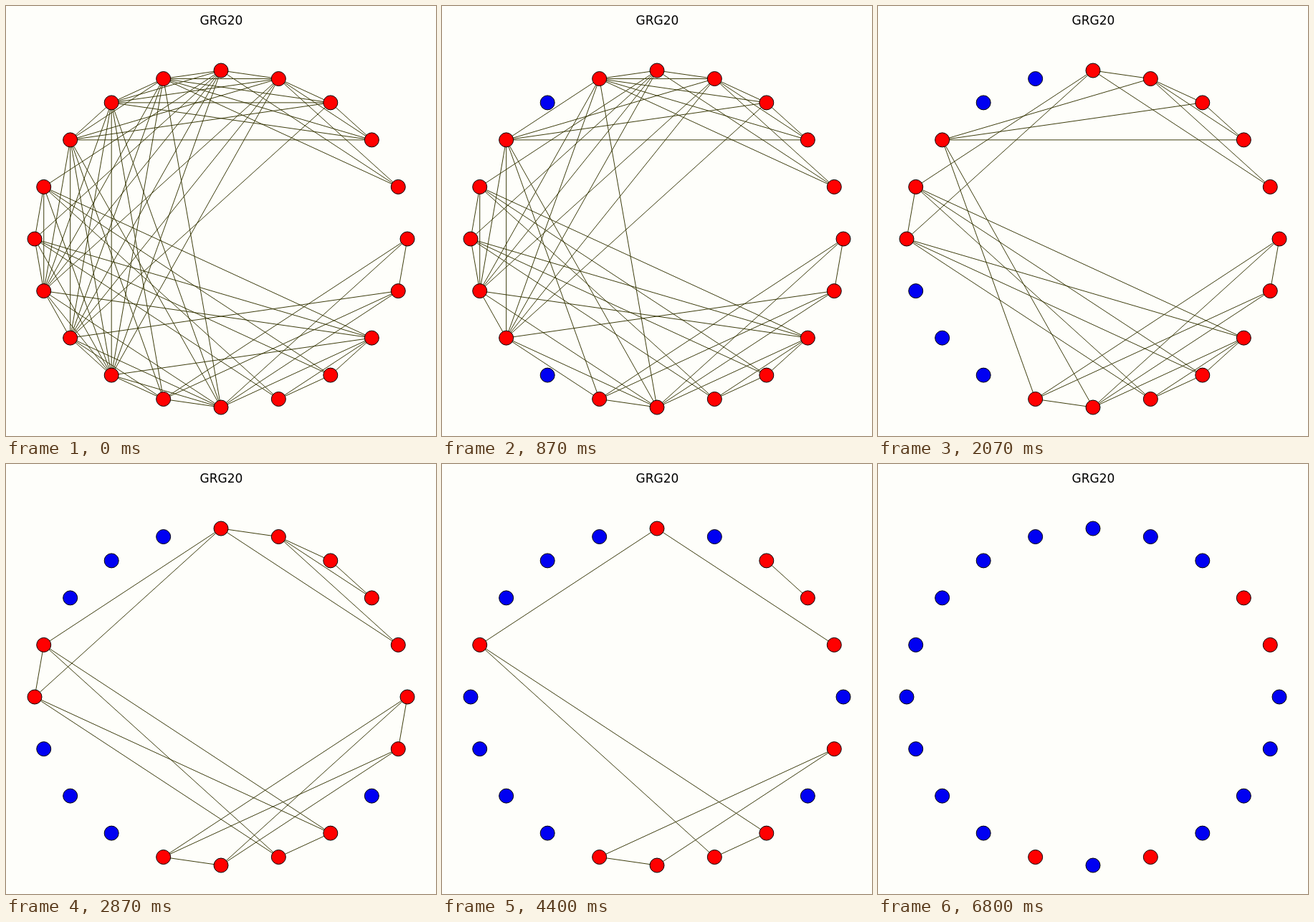
An HTML page for the animation above (6870 ms loop, 600 by 600 pixels).

```html
<!DOCTYPE html>
<html lang="en">
<head>
<meta charset="utf-8">
<title>Graph node removal</title>
<style>
  html, body { margin: 0; width: 100%; height: 100%; overflow: hidden; background: #fefefa; }
  svg { display: block; width: 100vw; height: 100vh; }
  line { stroke: #330; stroke-width: 0.95; }
  circle { fill: #f00; stroke: #000; stroke-width: 1; }
  circle.removed { fill: #0000f2; }
  line.removed { display: none; }
  text { font: 17px "DejaVu Sans", sans-serif; text-anchor: middle; }
</style>
</head>
<body>
<svg viewBox="0 0 600 600">
  <g id="edges"></g>
  <g id="nodes"></g>
  <text x="300.5" y="26">GRG20</text>
</svg>
<script>
const LOOP = 6870, FIRST_REMOVAL = 470, STEP = 400, START_NODE = 6;

// Geometric graph: two points share an edge when they lie closer than REACH.
const REACH = 100;
const points = [
  [40, 115], [-65, 108], [-70, 95], [-15, 65], [40, 75],
  [-15, 35], [-25, 25], [-55, 32], [90, 10], [88, 2],
  [15, 12], [-32, 7], [0, 0], [-90, -35], [-25, -60],
  [125, -20], [130, -10], [65, -40], [-105, -57], [-110, -90]
];

function addShape(parentId, tag, attributes) {
  const shape = document.createElementNS("http://www.w3.org/2000/svg", tag);
  for (const name in attributes) shape.setAttribute(name, attributes[name]);
  return document.getElementById(parentId).appendChild(shape);
}

// The nodes are drawn counter-clockwise on an ellipse, the last one at the right.
const nodes = points.map((point, i) => {
  const angle = 2 * Math.PI * (i + 1) / points.length;
  const x = 300 + 260 * Math.cos(angle), y = 325 - 235 * Math.sin(angle);
  return { point, x, y, removedAt: Infinity, shape: addShape("nodes", "circle", { cx: x, cy: y, r: 10 }) };
});

const edges = [];
nodes.forEach((a, i) => nodes.slice(i + 1).forEach(b => {
  const distance = Math.hypot(a.point[0] - b.point[0], a.point[1] - b.point[1]);
  if (distance >= REACH) return;
  const shape = addShape("edges", "line", { x1: a.x, y1: a.y, x2: b.x, y2: b.y });
  edges.push({ ends: [a, b], removedAt: Infinity, shape });
}));

const remainingEdges = node =>
  edges.filter(edge => edge.removedAt === Infinity && (!node || edge.ends.includes(node)));

// Remove the best connected node each step (the later one on a tie) until no edge is left.
let next = nodes[START_NODE];
for (let time = FIRST_REMOVAL; remainingEdges().length; time += STEP) {
  next.removedAt = time;
  for (const edge of remainingEdges(next)) edge.removedAt = time;
  next = nodes.reduce((best, node) =>
    remainingEdges(node).length >= remainingEdges(best).length ? node : best);
}

function draw() {
  const time = performance.now() % LOOP;
  for (const { shape, removedAt } of [...nodes, ...edges])
    shape.classList.toggle("removed", time >= removedAt);
  requestAnimationFrame(draw);
}
draw();
</script>
</body>
</html>
```
